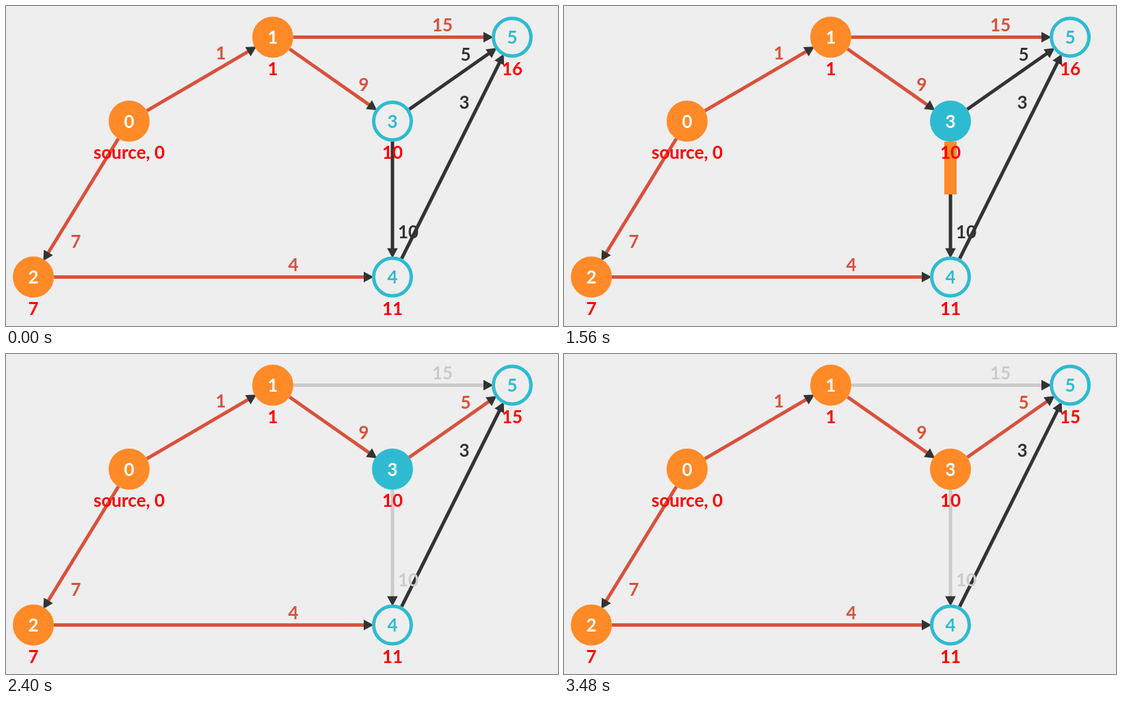
These frames come from a looping animation (807x467 px, 4.13 s). An HTML page:

```html
<!DOCTYPE html>
<html lang="en">
<head>
<meta charset="utf-8">
<title>Shortest paths</title>
<style>
html, body { margin: 0; width: 100%; height: 100%; overflow: hidden; background: #eee; }
svg { display: block; width: 100vw; height: 100vh; }
text { font: bold 26px Lato, "Open Sans", sans-serif; text-anchor: middle; }
</style>
</head>
<body>
<svg id="stage" viewBox="0 0 807 467"></svg>
<script>
const LOOP = 4130, STEP = 70;
const BG = '#eeeeee', BLUE = '#2ebbd1', ORANGE = '#ff8a27', RED = '#d9513c';
const DARK = '#333333', GREY = '#cbcbcb', WHITE = '#ffffff';
const RIM = 27.5;

// x, y, distance label, filled
const nodes = [
  [180, 168, 'source, 0', true],
  [390, 45.5, '1', true],
  [40, 395.5, '7', true],
  [565, 168, '10', false],
  [565, 395.5, '11', false],
  [740, 45.5, '16', false]
];
// from, to, weight, weight x, weight baseline, colour
const edges = [
  [0, 1, 1, 314, 78, RED],
  [0, 2, 7, 102, 352.5, RED],
  [1, 3, 9, 523, 124, RED],
  [1, 5, 15, 638, 37, RED],
  [2, 4, 4, 420, 387, RED],
  [3, 4, 10, 588, 339, DARK],
  [3, 5, 5, 672, 80, DARK],
  [4, 5, 3, 670, 150, DARK]
];

const stage = document.getElementById('stage');

function set(el, attrs) {
  for (const key in attrs) el.setAttribute(key, attrs[key]);
  return el;
}
function add(tag, attrs, parent = stage) {
  return parent.appendChild(set(document.createElementNS('http://www.w3.org/2000/svg', tag), attrs));
}
function write(str, x, y, fill, parent) {
  const el = add('text', { x, y, fill }, parent);
  el.textContent = str;
  return el;
}

const [lineLayer, sweepLayer, nodeLayer, textLayer] = [0, 1, 2, 3].map(() => add('g', {}));

// Straight run between two node rims
function run(a, b) {
  const [x1, y1] = nodes[a], [x2, y2] = nodes[b];
  const len = Math.hypot(x2 - x1, y2 - y1);
  const ux = (x2 - x1) / len, uy = (y2 - y1) / len;
  return { ux, uy, span: len - 30 - RIM, at: d => [x1 + ux * (30 + d), y1 + uy * (30 + d)] };
}
function place(line, path, end) {
  const [x1, y1] = path.at(0), [x2, y2] = path.at(end);
  set(line, { x1, y1, x2, y2 });
}

const edgeViews = edges.map(([a, b, weight, x, y, color]) => {
  const path = run(a, b);
  const line = add('line', { 'stroke-width': 5 }, lineLayer);
  place(line, path, path.span - 10);
  const tip = path.at(path.span), base = path.at(path.span - 14.5);
  const side = s => [base[0] - path.uy * s, base[1] + path.ux * s];
  add('polygon', { points: [tip, side(7.8), side(-7.8)].join(' '), fill: DARK }, lineLayer);
  const label = write(weight, x, y, color, textLayer);
  return { path, line, label };
});

const nodeViews = nodes.map(([cx, cy, dist, filled], i) => {
  const color = filled ? ORANGE : BLUE;
  const disc = add('circle', {
    cx, cy, r: RIM, 'stroke-width': 5, stroke: color, fill: filled ? color : BG
  }, nodeLayer);
  const digit = write(i, cx, cy + 9.5, filled ? WHITE : BLUE, nodeLayer);
  return { disc, digit, label: write(dist, cx, cy + 55, '#ff0000', textLayer) };
});

const sweep = add('line', { 'stroke-width': 18, stroke: ORANGE }, sweepLayer);

function ease(t, start, dur) {
  const p = Math.min(1, Math.max(0, (t - start) / dur));
  return p < 0.5 ? 4 * p ** 3 : 1 - 4 * (1 - p) ** 3;
}
function mix(a, b, k) {
  const part = (c, i) => parseInt(c.slice(i, i + 2), 16);
  return `rgb(${[1, 3, 5].map(i => Math.round(part(a, i) + (part(b, i) - part(a, i)) * k))})`;
}
function paint(i, color) {
  edgeViews[i].line.setAttribute('stroke', color);
  edgeViews[i].label.setAttribute('fill', color);
}

function draw(ms) {
  const origin = ms < 2700 ? 860 : 2990;
  const t = origin + Math.floor((ms - origin) / STEP) * STEP;

  edges.forEach((e, i) => paint(i, e[5]));
  paint(3, mix(RED, GREY, ease(t, 1860, 500)));
  if (t >= 1840) paint(5, GREY);
  if (t >= 2400) paint(6, RED);

  // Node 3: visited, then settled
  const fill = ease(t, 722, 500);
  const done = mix(BLUE, ORANGE, ease(t, 2920, 560));
  const { disc, digit } = nodeViews[3];
  set(disc, { stroke: done, fill: fill < 1 ? mix(BG, BLUE, fill) : done });
  digit.setAttribute('fill', mix(BLUE, WHITE, fill));
  nodeViews[5].label.textContent = t < 1910 ? '16' : '15';

  // Edge being relaxed
  const second = t >= 1840;
  const grow = ease(t, second ? 1850 : 1318, 500);
  const { path } = edgeViews[second ? 6 : 5];
  place(sweep, path, path.span * grow);
  const shown = t >= 1420 && t < 1840 || t >= 1980 && t < 2400;
  sweep.setAttribute('visibility', shown ? 'visible' : 'hidden');
}

const begin = performance.now();
function tick() {
  draw((performance.now() - begin) % LOOP);
  requestAnimationFrame(tick);
}
tick();
</script>
</body>
</html>
```
